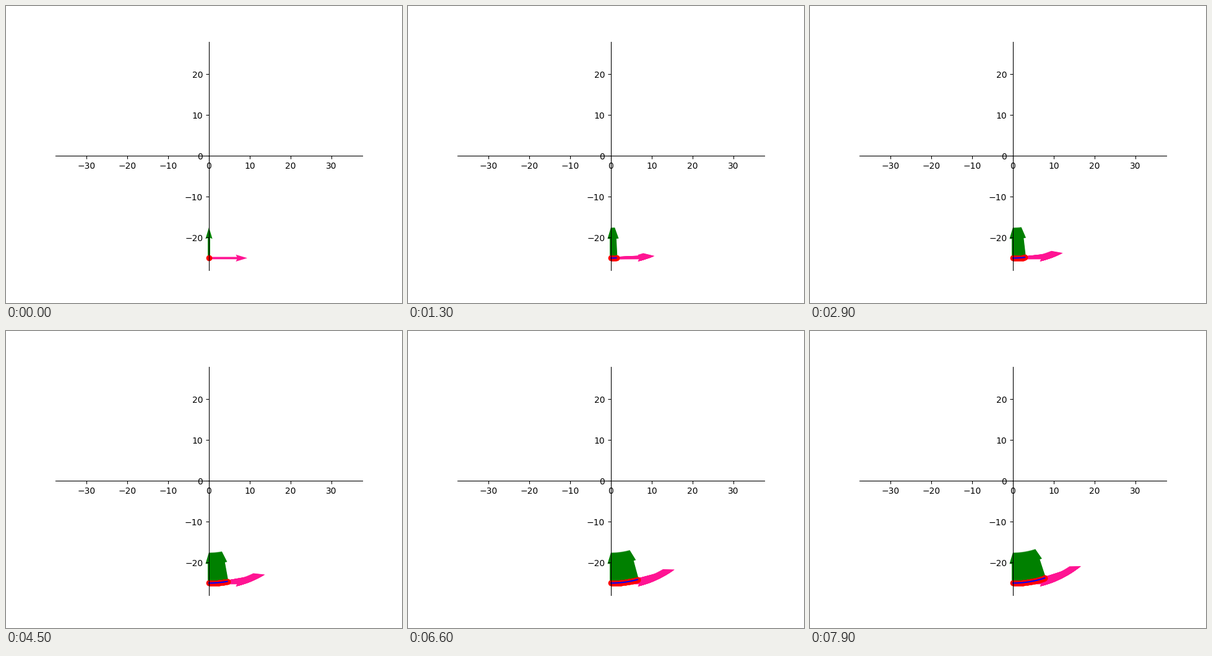
A matplotlib script that plays this animation: 640 px wide and 480 px high, repeating every 8000 ms.

```python
import numpy as np
import matplotlib.pyplot as plt
from matplotlib.animation import FuncAnimation

R = 25.0        # orbit radius
SPEED = 10.0
DT = 0.01
STEPS = 80
Y_MAX = 28.0

fig, ax = plt.subplots(figsize=(6.4, 4.8), dpi=100)
box = ax.get_position()
x_max = Y_MAX * (box.width * 6.4) / (box.height * 4.8)
ax.set_xlim(-x_max, x_max)
ax.set_ylim(-Y_MAX, Y_MAX)
for side in ("left", "bottom"):
    ax.spines[side].set_position("zero")
for side in ("right", "top"):
    ax.spines[side].set_visible(False)

theta = SPEED / R * DT * np.arange(STEPS)
xs, ys = R * np.sin(theta), -R * np.cos(theta)
vx, vy = SPEED * np.cos(theta), SPEED * np.sin(theta)
acc = SPEED ** 2 / R
ux, uy = -acc * np.sin(theta), acc * np.cos(theta)


def make_step(i):
    """Velocity arrow, acceleration arrow and body for one time step."""
    return (
        ax.quiver(xs[i], ys[i], vx[i], vy[i], color="deeppink", scale=80),
        ax.quiver(xs[i], ys[i], ux[i], uy[i], color="green", scale=40),
        ax.scatter(xs[i], ys[i], color="red"),
    )


steps = [make_step(i) for i in range(STEPS)]
path, = ax.plot([], [], color="blue")


def update(k):
    for i, artists in enumerate(steps):
        for artist in artists:
            artist.set_visible(i <= k)
    path.set_data(xs[:k + 1], ys[:k + 1])
    return [path]


anim = FuncAnimation(fig, update, frames=STEPS, interval=100,
                     repeat=True, repeat_delay=0, blit=False)
plt.show()
```
